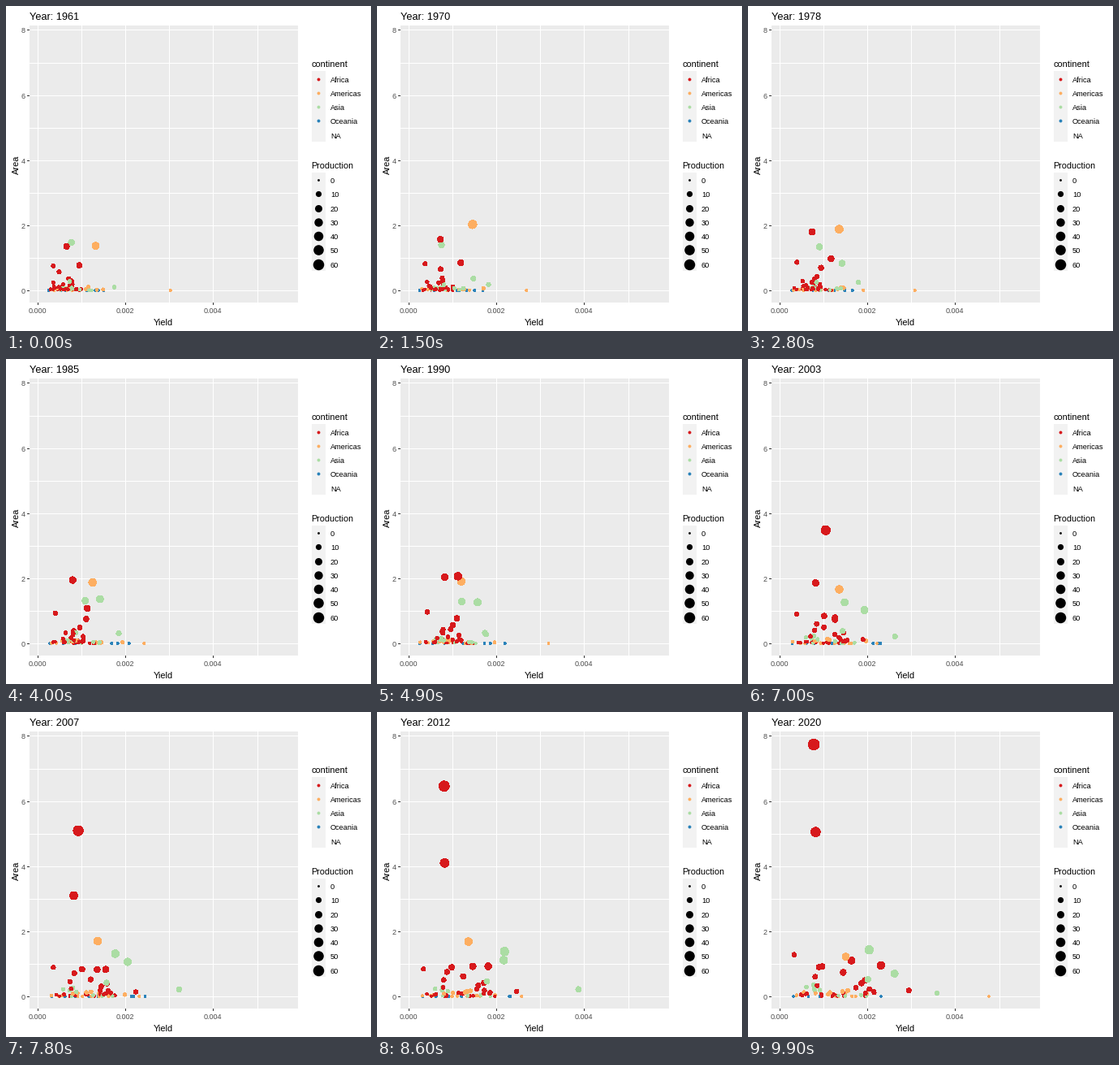
Animation of 450x400 px, one loop 10 s. Source, as a matplotlib script:

```python
import numpy as np
import matplotlib.pyplot as plt
from matplotlib.animation import FuncAnimation
from matplotlib.patches import Rectangle

W, H, DPI = 450, 400, 100
PX = 72 / DPI
FRAMES, INTERVAL = 100, 100
FIRST, LAST = 1961, 2020
X0, Y0 = 39.5, 350              # pixel position of the data zero
X_UNIT, Y_UNIT = 54.1, 40.05    # pixels per 0.001 yield and per unit of area

AFRICA, AMERICAS, ASIA, OCEANIA = "#D7191C", "#FDAE61", "#ABDDA4", "#2B83BA"
CONTINENTS = {"Africa": AFRICA, "Americas": AMERICAS, "Asia": ASIA,
              "Oceania": OCEANIA, "NA": None}

plt.rcParams["font.family"] = "Liberation Sans"
rng = np.random.default_rng(61)
years = np.linspace(FIRST, LAST, FRAMES)
decades = np.linspace(FIRST, LAST, 8)
paths, colors = [], []


def unrest(amount):
    """Relative change of a harvest, new each year."""
    seasons = np.arange(FIRST, LAST + 1)
    return amount * np.interp(years, seasons, rng.normal(size=len(seasons)))


def path(color, when, yields, areas, shake=0.05):
    """Straight moves between poses; the yearly unrest fades at each pose."""
    phase = np.interp(years, when, range(len(when)))
    loose = shake * np.sin(np.pi * phase) ** 2
    x = np.interp(years, when, yields) * (1 + loose * unrest(1))
    y = np.interp(years, when, areas) * (1 + loose * unrest(1))
    paths.append(np.column_stack([x, y]))
    colors.append(color)


def poses(color, *points, shake=0.03):
    path(color, *zip(*points), shake=shake)


def crowd(color, n, lo, hi, lift):
    """Small producers strolling along the base line, slowly spreading."""
    for base in np.linspace(lo, hi, n):
        walk = np.cumsum(rng.normal(0, 0.07, len(decades)))
        yields = base * np.linspace(1, 1.5, len(decades)) * np.exp(walk)
        areas = lift * rng.exponential(1, len(decades))
        path(color, decades, np.clip(yields, 0.12, 2.3), areas)


def growers(color, n, yield_end, area_start, area_end):
    """Mid-size producers whose area and yield rise faster towards the end."""
    t = np.linspace(0, 1, len(decades))
    for rank in range(n):
        fall = np.exp(-rank / 5)
        start = rng.uniform(0.3, 0.8)
        end = start + rng.uniform(0, 1) ** 2 * (yield_end - start)
        areas = fall * (area_start + (area_end - area_start) * t ** 2)
        path(color, decades, start + (end - start) * t ** 1.5, areas)


crowd(OCEANIA, 8, 0.25, 1.7, 0)
crowd(AMERICAS, 11, 0.25, 1.5, 0.03)
crowd(AFRICA, 11, 0.25, 1.1, 0.03)
crowd(ASIA, 5, 0.5, 1.3, 0.03)
growers(AMERICAS, 4, 1.8, 0.08, 0.18)
growers(ASIA, 4, 3.2, 0.1, 0.35)
growers(AFRICA, 15, 3, 0.36, 1.1)

# leading producers: year, yield, area
poses(AMERICAS, (1961, 3.02, 0), (1964, 3.17, 0), (1970, 2.67, 0), (1972, 3.6, 0),
      (1985, 2.4, 0), (1991, 3.3, 0), (1995, 2.05, 0), (2012, 2.4, 0),
      (2017, 5.65, 0), (2020, 4.76, 0), shake=0)
poses(ASIA, (1961, 0.77, 0.08), (1985, 0.86, 0.32), (1995, 2.53, 0.24),
      (2003, 2.62, 0.21), (2012, 3.87, 0.22), (2020, 3.58, 0.1), shake=0.01)
poses(ASIA, (1961, 1.74, 0.1), (1985, 1.84, 0.31), (2003, 1.42, 0.38), (2020, 2, 0.52))
poses(AFRICA, (1961, 0.57, 0.18), (1985, 0.8, 0.3), (2003, 1.26, 0.8), (2020, 2.3, 0.95))
poses(AFRICA, (1961, 0.48, 0.57), (1985, 1.1, 0.75), (2020, 0.96, 0.92))
poses(AFRICA, (1961, 0.35, 0.75), (1995, 0.42, 1), (2012, 0.33, 0.83), (2020, 0.32, 1.28))
poses(ASIA, (1961, 0.72, 0.27), (1970, 1.47, 0.36), (1985, 1.41, 1.37),
      (2003, 1.93, 1.02), (2012, 2.14, 1.13), (2020, 2.61, 0.7))
poses(ASIA, (1961, 0.76, 1.47), (1970, 0.74, 1.4), (1985, 1.08, 1.31),
      (2003, 1.48, 1.26), (2012, 2.18, 1.38), (2020, 2.03, 1.43))
poses(AMERICAS, (1961, 1.31, 1.37), (1970, 1.45, 2.03), (1985, 1.24, 1.87),
      (1995, 1.29, 1.96), (2003, 1.35, 1.65), (2012, 1.35, 1.7), (2020, 1.5, 1.22))
poses(AFRICA, (1961, 0.65, 1.35), (1985, 0.79, 1.95), (1995, 0.81, 2.06),
      (2003, 0.81, 1.85), (2012, 0.81, 4.07), (2020, 0.81, 5.05))
poses(AFRICA, (1961, 0.94, 0.77), (1970, 1.18, 0.85), (1985, 1.12, 1.08),
      (1995, 1.07, 2.95), (2003, 1.04, 3.5), (2012, 0.8, 6.42), (2020, 0.77, 7.74))

paths = np.array(paths)


def marker_area(size):
    """Marker area in square points for a plot size in millimetres."""
    return (0.75 * (size * 2.845 + 0.945) * PX) ** 2


def production_size(production):
    return 1 + 5 * np.sqrt(production / 60)


fig = plt.figure(figsize=(W / DPI, H / DPI), dpi=DPI, facecolor="white")
ax = fig.add_axes([0, 0, 1, 1])
ax.set(xlim=(0, W), ylim=(H, 0))
ax.axis("off")


def box(x, y, w, h, color):
    ax.add_patch(Rectangle((x, y), w, h, fc=color, lw=0, antialiased=False))


def label(x, y, text, size, color="black", **kw):
    return ax.text(x, y, text, fontsize=size * PX, color=color, va="baseline", **kw)


def dots(x, y, **kw):
    return ax.scatter(x, y, linewidths=0, antialiased=False, zorder=3, **kw)


# panel, grid and axes
box(29, 24, 331, 341, "#EBEBEB")
columns = [int(39.2 + 54.17 * i) for i in range(6)]
rows = [int(350.9 - 40.12 * i) for i in range(9)]
for x in columns:
    box(x, 24, 1, 341, "white")
for y in rows:
    box(29, y, 331, 1, "white")
for i, x in enumerate(columns[::2]):
    box(x, 365, 1, 3, "#333333")
    label(x + 0.2, 378.5, f"{0.002 * i:.3f}", 9, "#4D4D4D", ha="center")
for i, y in enumerate(rows[::2]):
    box(26, y, 3, 1, "#333333")
    label(24, y + 3.8, str(2 * i), 9, "#4D4D4D", ha="right")
label(194.2, 393, "Yield", 11, ha="center")
label(16, 195, "Area", 11, ha="center", rotation=90, rotation_mode="anchor")
title = label(29, 17, "", 12.8)

# legends
KEY = 17.28
label(376.6, 75, "continent", 11)
box(377, 80, 17, 87, "#F2F2F2")
for i, (name, color) in enumerate(CONTINENTS.items()):
    y = 89.6 + KEY * i
    if color:
        dots(385.2, y, s=marker_area(1.5), c=color)
    label(400, y + 4, name, 9.3)

label(376.6, 200, "Production", 10.8)
box(377, 205, 17, 121, "#F2F2F2")
for i in range(7):
    y = 214 + KEY * i
    dots(385.2, y, s=marker_area(production_size(10 * i)), c="black")
    label(400, y + 4, str(10 * i), 9.3)

bubbles = dots(paths[:, 0, 0], paths[:, 0, 1], c=colors)


def update(i):
    yields, areas = paths[:, i].T
    bubbles.set_offsets(np.column_stack([X0 + X_UNIT * yields, Y0 - Y_UNIT * areas]))
    bubbles.set_sizes(marker_area(production_size(10 * yields * areas)))
    title.set_text(f"Year: {round(years[i])}")
    return bubbles, title


anim = FuncAnimation(fig, update, frames=FRAMES, interval=INTERVAL,
                     repeat=True, repeat_delay=0, blit=False)
plt.show()
```
